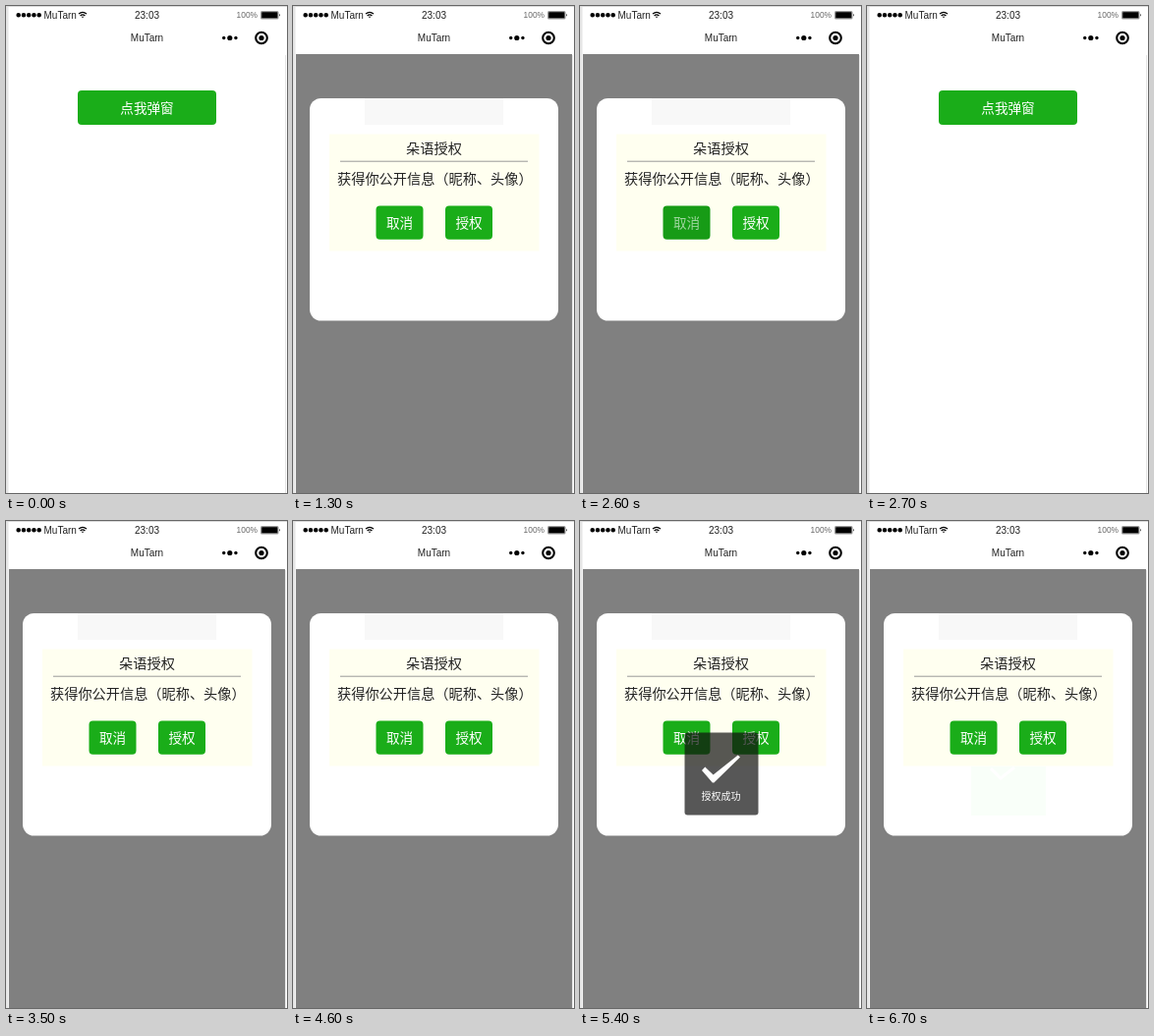
Write an HTML page that moves like this. It is 286 px wide and 496 px high and loops after 8 s.

```html
<!DOCTYPE html>
<html lang="zh-CN">
<head>
<meta charset="utf-8">
<title>Popup demo</title>
<style>
html, body { margin: 0; width: 100%; height: 100%; overflow: hidden; background: #fff; }
svg { display: block; width: 100vw; height: 100vh; }
text { font-family: "Noto Sans CJK SC", "Noto Sans CJK", sans-serif; font-size: 13.6px; text-anchor: middle; fill: #222; }
.latin { font: 10px "Liberation Sans", Arial, sans-serif; }
.body { font-size: 14.2px; }
.button rect { fill: #1aad19; }
.button text { fill: #fff; font-weight: 500; }
.pressed rect { fill: #179b16; }
.pressed text { fill: rgba(255, 255, 255, .6); }
</style>
</head>
<body>
<svg viewBox="0 0 286 496">
  <path d="M0 0H2.5V496H0Z" fill="#e6e6e6"/>
  <path d="M0 .5H286" stroke="#ddd"/>
  <path d="M284.5 50V496" stroke="#e6e6e6"/>

  <!-- Status bar -->
  <path d="M12.7 9.2H35" stroke="#000" stroke-width="4.6" stroke-linecap="round" stroke-dasharray="0 5.25"/>
  <text class="latin" x="38.5" y="12.5" style="text-anchor:start">MuTarn</text>
  <g fill="none" stroke="#000" stroke-width="1.3">
    <path d="M74 8Q78 4.6 82 8M75.6 9.9Q78 7.9 80.4 9.9"/>
    <path d="M76.8 10.8H79.2L78 12.2Z" fill="#000" stroke="none"/>
  </g>
  <text class="latin" x="143.5" y="12.5">23:03</text>
  <text class="latin" x="245.3" y="12.3" style="font-size:8.4px;fill:#666">100%</text>
  <rect x="259" y="5" width="18.5" height="8.5" rx="1.5" fill="#999"/>
  <rect x="260.3" y="6.3" width="16" height="6" rx=".5"/>
  <path d="M278 7.8Q279.6 9.3 278 10.8Z"/>

  <!-- Navigation bar -->
  <text class="latin" x="143.5" y="36">MuTarn</text>
  <circle cx="221.7" cy="32.5" r="1.7"/>
  <circle cx="227.8" cy="32.5" r="2.6"/>
  <circle cx="233.9" cy="32.5" r="1.7"/>
  <circle cx="260" cy="32.5" r="5.8" fill="none" stroke="#000" stroke-width="2.1"/>
  <circle cx="260" cy="32.5" r="2.6"/>

  <g id="home" class="button">
    <rect x="73" y="86" width="141" height="35" rx="4"/>
    <text x="143.5" y="109.2">点我弹窗</text>
  </g>

  <g id="dialog">
    <path d="M3 49H284V496H3Z" fill="#808080"/>
    <rect x="17" y="94" width="253" height="226.5" rx="11.5" fill="#fff"/>
    <path d="M73 94H214V121H73Z" fill="#f8f8f8"/>
    <path d="M37 130.5H250.5V249.5H37Z" fill="#fffff0"/>
    <text class="body" x="143.5" y="150.4">朵语授权</text>
    <path d="M48 158.2H239" stroke="#999"/>
    <text class="body" x="45" y="181.3" style="text-anchor:start">获得你公开信息（昵称、头像）</text>
    <g id="cancel" class="button">
      <rect x="84.5" y="203.5" width="48" height="34.2" rx="4"/>
      <text x="108.5" y="226.2">取消</text>
    </g>
    <g id="allow" class="button">
      <rect x="155" y="203.5" width="48" height="34.2" rx="4"/>
      <text x="179" y="226.2">授权</text>
    </g>
    <g id="trace">
      <path d="M106 250H182V300H106Z" fill="#f9fff9"/>
      <path d="M126 252L136 262L150 251" fill="none" stroke="#fff" stroke-width="3"/>
    </g>
    <g id="toast">
      <rect x="106.5" y="215.5" width="75" height="84" rx="3" fill="#111" fill-opacity=".7"/>
      <path d="M124 254L127.3 250.6L135.6 258.6L160.7 238.6L163 240.6L136.4 266.6H134.8Z" fill="#fff"/>
      <text x="143.5" y="284" style="font-size:10px;fill:#fff">授权成功</text>
    </g>
  </g>
</svg>
<script>
const $ = id => document.getElementById(id);
const show = (id, on) => { $(id).style.display = on ? '' : 'none'; };
const press = (id, on) => $(id).classList.toggle('pressed', on);

function draw(now) {
  const t = now % 8000;
  const within = (from, to) => t >= from && t < to;
  const open = within(1300, 2700) || t >= 3500;
  show('home', !open);
  show('dialog', open);
  press('cancel', within(2600, 2700));
  press('allow', within(4500, 4600));
  show('toast', within(5400, 6700));
  show('trace', t >= 6700);
}

const start = performance.now();
function tick() {
  draw(performance.now() - start);
  requestAnimationFrame(tick);
}
tick();
</script>
</body>
</html>
```
